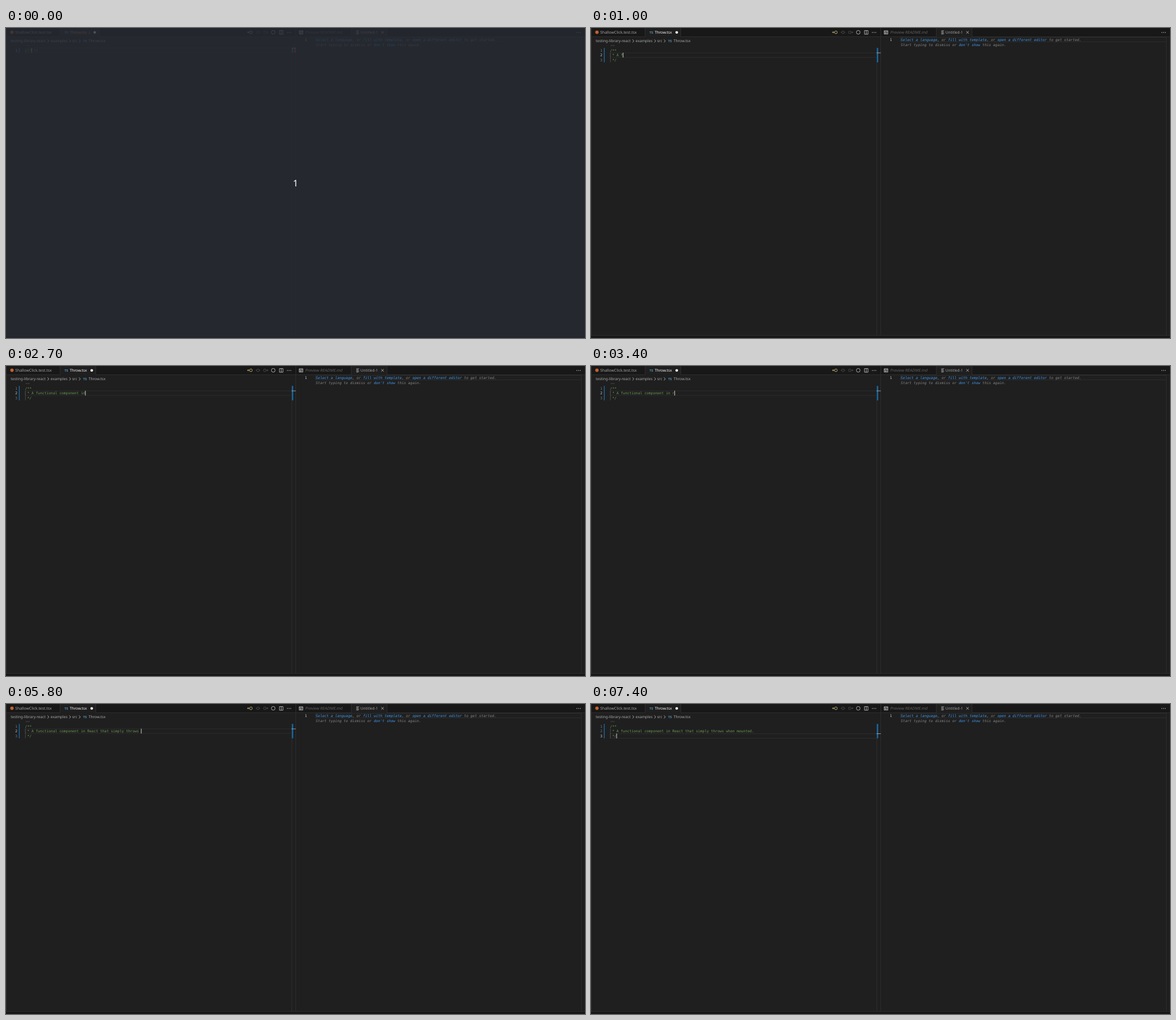
Recreate the animation shown at these times as an HTML page. Size 1022x548 px, loop 8 s.

```html
<!DOCTYPE html>
<html lang="en">
<head>
<meta charset="utf-8">
<title>Editor typing</title>
<style>
  html, body { margin: 0; width: 100%; height: 100%; overflow: hidden; background: #1f1f1f; }
  svg { display: block; width: 1022px; height: 548px; }
  text { font: 6.65px "Noto Sans", "Open Sans", sans-serif; white-space: pre; text-rendering: geometricPrecision; }
  .code text { font: 6.3px "DejaVu Sans Mono", monospace; }
  .code .hint { font-style: italic; fill: #888; }
  .hint tspan { fill: #3f9bf5; }
  .comment { fill: #6a9955; }
  text.ts { font-size: 5.6px; font-weight: 700; fill: #519aba; }
  .line { fill: none; stroke: #2d2d2d; }
  .icon { fill: none; stroke: #ccc; stroke-width: .8; }
  .dim { stroke: #555; }
</style>
</head>
<body>
<svg viewBox="0 0 1022 548">
  <rect width="1022" height="548" fill="#1f1f1f"/>
  <rect width="1022" height="16" fill="#181818"/>
  <rect y="544" width="1022" height="4" fill="#181818"/>
  <path class="line" d="M0 15.5H1022M0 543.5H1022M.5 0V544M95.5 0V16M511.5 0V544M609.5 0V16M504.5 35V544M1015.5 16V544"/>

  <!-- left tabs -->
  <circle cx="10.5" cy="7.6" r="3" fill="#c4602f"/>
  <text x="16.3" y="10" font-size="6.8" style="font-size:6.8px" fill="#a8a8a8">ShallowClick.test.tsx</text>
  <rect id="tab" x="96" width="68" height="16" fill="#1f1f1f"/>
  <path id="tabEdge" class="line" d="M.5 0V16"/>
  <text class="ts" x="103.2" y="9.8">TS</text>
  <text id="title" x="112.6" y="10">Throw.tsx</text>
  <text id="badge" x="145.5" y="10" style="font-size:5.8px" fill="#d5695c"></text>
  <circle id="dirty" cy="7.7" r="2.3" fill="#fff"/>

  <!-- left actions -->
  <g class="icon">
    <path d="M430 7.6H426.3M428 5.9L426.3 7.6L428 9.3" stroke="#d8c987"/>
    <circle cx="432.3" cy="7.6" r="2.4" stroke="#d8c987"/>
    <g class="dim">
      <circle cx="444.8" cy="7.6" r="2.3"/><path d="M440.8 7.6H442.4M447.2 7.6H448.8"/>
      <circle cx="456.8" cy="7.6" r="2.3"/><path d="M459.2 7.6H462.5M460.9 5.9L462.5 7.6L460.9 9.3"/>
    </g>
    <circle cx="471.7" cy="7.6" r="3.3"/>
    <path d="M482.7 4.5H489V11H482.7ZM485.9 4.5V11"/>
  </g>
  <g fill="#ccc">
    <path id="more" d="M496 7.2h1.2v1.2h-1.2zM499 7.2h1.2v1.2h-1.2zM502 7.2h1.2v1.2h-1.2z"/>
    <use href="#more" x="511"/>
  </g>

  <!-- breadcrumbs -->
  <g fill="#a9a9a9">
    <text x="8.3" y="25.2">testing-library-react</text>
    <text x="78.8" y="25.2">examples</text>
    <text x="116.7" y="25.2">src</text>
    <text class="ts" x="136.2" y="25">TS</text>
    <text x="145.7" y="25.2">Throw.tsx</text>
  </g>
  <path class="icon" stroke="#999" d="M73.3 20.3l2.4 2.6l-2.4 2.6M111.8 20.3l2.4 2.6l-2.4 2.6M128.8 20.3l2.4 2.6l-2.4 2.6"/>
  <path d="M35 30.5h1.1v1.1h-1.1zM37.5 30.5h1.1v1.1h-1.1zM40 30.5h1.1v1.1h-1.1z" fill="#777"/>

  <!-- right tabs -->
  <path class="icon" stroke="#888" d="M517.5 4.8H524V10.8H517.5ZM517.5 6.3H524M519 8H520.5V9.5H519ZM521.7 8H523M521.7 9.5H523"/>
  <text transform="translate(528 10) skewX(-12)" style="font-size:6.75px" fill="#646464">Preview README.md</text>
  <rect x="610" width="62" height="16" fill="#1f1f1f"/>
  <path class="line" d="M672.5 0V16"/>
  <path class="icon" stroke="#aaa" d="M618.3 5H623.3M618.3 6.9H621.8M618.3 8.8H623.3M618.3 10.7H622.3"/>
  <text x="625.7" y="10" fill="#a0a0a0">Untitled-1</text>
  <path class="icon" stroke="#999" d="M662.4 5.5l4.4 4.4M666.8 5.5l-4.4 4.4"/>

  <!-- right editor -->
  <g class="code">
    <path class="line" d="M1015 16.5H546.5V24.5H1015"/>
    <text x="527.5" y="23.2" fill="#ccc">1</text>
    <text class="hint" x="546.8" y="23.2"><tspan>Select a language</tspan>, or <tspan>fill with template</tspan>, or <tspan>open a different editor</tspan> to get started.</text>
    <text class="hint" x="546.8" y="31.7">Start typing to dismiss or <tspan>don't show</tspan> this again.</text>
  </g>

  <!-- left editor -->
  <g class="code">
    <path id="current" class="line" d="M504 35.5H33.5V43.5H504"/>
    <path id="guide" d="M34.3 43.7V60.7" stroke="#555" stroke-width=".8"/>
    <rect id="gutter" x="22.8" y="35.2" width="1.3" fill="#1b6fae"/>
    <rect id="ruler" x="504.6" y="35.2" width="2.4" fill="#1467a5"/>
    <rect id="error" x="509" y="35.2" width="2.4" height="8.5" fill="#c4281f"/>
    <rect id="mark" x="504" width="7.5" height="1" fill="#a0a0a0"/>
    <path id="dots" d="M35 41.7h1v1h-1zM37.2 41.7h1v1h-1zM39.4 41.7h1v1h-1z" fill="#888"/>
    <g id="rows"></g>
    <rect id="cursor" width="1" height="8.5" fill="#d0d0cc"/>
  </g>

  <g id="countdown">
    <rect width="1022" height="548" fill="#262b32" fill-opacity=".82"/>
    <text x="511" y="279.6" text-anchor="middle" style="font-size:16px" fill="#fff">1</text>
  </g>
</svg>
<script>
const $ = id => document.getElementById(id);
const set = (id, attrs) => { for (const k in attrs) $(id).setAttribute(k, attrs[k]); };
const show = (id, on) => set(id, { visibility: on ? 'visible' : 'hidden' });

const LOOP = 8000, STEP = 100, LINE = 8.5, TOP = 35.2, LEFT = 33.6, CHAR = 3.793;
const SENTENCE = ' * A functional component in React that simply throws when mounted.';

// Typing bursts: first step, last step, characters present at the end
const BURSTS = [
  [700, 800, 5], [1000, 1200, 9], [1400, 1800, 16], [2000, 2800, 29],
  [3000, 3100, 31], [3400, 3400, 30], [3500, 3500, 29], [3600, 3700, 31], [3800, 3800, 33],
  [4000, 4800, 45], [4900, 5000, 47], [5200, 5600, 52], [5800, 5800, 54],
  [6000, 6800, 64], [6900, 7100, 67]
];

function typedCount(t) {
  let count = 3;
  for (const [start, end, target] of BURSTS) {
    if (t < start) break;
    const steps = (end - start) / STEP + 1;
    const done = Math.min(steps, Math.floor((t - start) / STEP) + 1);
    count = Math.round(count + (target - count) * done / steps);
  }
  return count;
}

function typedText(t) {
  const text = SENTENCE.slice(0, typedCount(t));
  return t >= 3000 && t < 3500 ? text.replace(' Re', ' re').replace(/ R$/, ' r') : text;
}

const rows = [0, 1, 2].map(i => {
  const add = attrs => {
    const el = document.createElementNS('http://www.w3.org/2000/svg', 'text');
    for (const k in attrs) el.setAttribute(k, attrs[k]);
    return $('rows').appendChild(el);
  };
  const y = TOP + 6.6 + i * LINE;
  return { number: add({ x: 20, y, 'text-anchor': 'end' }), code: add({ x: LEFT, y, class: 'comment' }) };
});

function draw(t) {
  const row = t < 300 ? 0 : t < 7400 ? 1 : 2;
  const broken = t < 600;
  const changed = t < 500 ? LINE : 3 * LINE;
  const lines = row ? ['/**', typedText(t), ' */'] : ['/** */'];

  rows.forEach(({ number, code }, i) => {
    number.textContent = i < lines.length ? i + 1 : '';
    number.setAttribute('fill', i === row ? '#ccc' : '#6e7681');
    code.textContent = lines[i] || '';
  });

  const column = row === 1 ? lines[1].length : 3;
  set('cursor', { x: LEFT + column * CHAR - .2, y: TOP + row * LINE });
  set('current', { transform: `translate(0 ${row * LINE})` });
  set('mark', { y: 35 + row * LINE });
  set('gutter', { height: changed });
  set('ruler', { height: changed });
  show('guide', row > 0);
  show('dots', broken);
  show('error', broken);

  set('tab', { width: broken ? 68 : 62 });
  set('tabEdge', { transform: `translate(${broken ? 164 : 158} 0)` });
  set('title', { fill: broken ? '#f08070' : '#fff' });
  set('dirty', { cx: broken ? 156.6 : 151.3 });
  $('badge').textContent = broken ? (t < 100 ? 2 : 1) : '';
  show('countdown', t < 100);
}

function tick() {
  draw(performance.now() % LOOP);
  requestAnimationFrame(tick);
}
tick();
</script>
</body>
</html>
```
